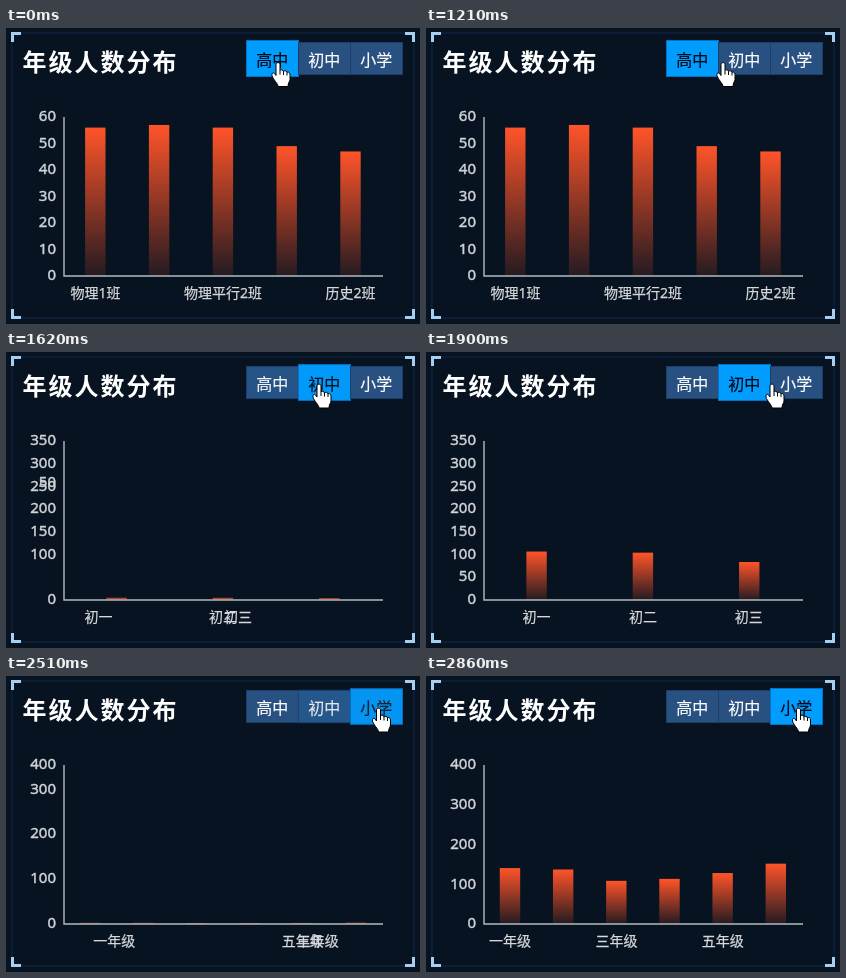
Animation of 414x296 px, one loop 2.92 s. Source, as an HTML page:

```html
<!DOCTYPE html>
<html lang="zh-CN">
<head>
<meta charset="utf-8">
<title>年级人数分布</title>
<style>
  html, body { margin: 0; width: 100%; height: 100%; overflow: hidden; background: #071320; }
  svg { display: block; width: 414px; height: 296px; font-family: "Noto Sans", "Noto Sans CJK SC", "Noto Sans CJK", sans-serif; }
  .title { font: bold 24px "Noto Sans CJK SC", "Noto Sans CJK", sans-serif; letter-spacing: 2px; fill: #fff; }
  .tab { font-size: 16px; text-anchor: middle; }
  .y { font-size: 15px; text-anchor: end; fill: #d0d3d7; stroke: #d0d3d7; stroke-width: .45px; }
  .x { font-size: 14px; text-anchor: middle; fill: #d6d8db; stroke: #d6d8db; stroke-width: .25px; }
</style>
</head>
<body>
<svg viewBox="0 0 414 296">
  <defs>
    <linearGradient id="bar" x1="0" y1="0" x2="0" y2="1">
      <stop offset="0" stop-color="#ff5429"/>
      <stop offset="1" stop-color="#ff5429" stop-opacity=".12"/>
    </linearGradient>
  </defs>
  <rect width="414" height="296" fill="#071320"/>
  <rect x="6" y="5" width="402" height="285" fill="none" stroke="#132a4c"/>
  <path d="M6.5 14V5.5H15M399 5.5H407.5V14M407.5 281V289.5H399M15 289.5H6.5V281" fill="none" stroke="#a6d0f2" stroke-width="3"/>
  <text class="title" x="16.5" y="42.5">年级人数分布</text>
  <g id="tabs"></g>
  <g id="chart"></g>
  <path d="M58 89V248H377" fill="none" stroke="#b4bac0" stroke-width="1.4"/>
  <g id="hand" stroke="#000" stroke-linejoin="round">
    <path fill="#fff" d="M-2 2C-2-.5 2-.5 2 2V8C2 7 5.5 7 5.5 9C6 8 9 8 9 10C9.5 9 12 9.5 12 12V17C12 19 10 20 10 24H0C0 21-5 17-6 13C-6.5 10-4 10-3.5 11L-2 13Z"/>
    <path fill="none" d="M2 8V12M5.5 9V12.5M9 10V13"/>
  </g>
</svg>
<script>
const LOOP = 2920, LEFT = 58, BASE = 248, WIDTH = 319, HEIGHT = 159;

// Each stage: click time, axis maximum and step, category names, label interval, bar values
const stages = [
  { start: -5000, max: 60, step: 10, every: 2, tab: '高中',
    names: ['物理1班', '物理2班', '物理平行2班', '历史1班', '历史2班'], values: [56, 57, 56, 49, 47] },
  { start: 1456, max: 350, step: 50, every: 1, tab: '初中',
    names: ['初一', '初二', '初三'], values: [324, 316.5, 254] },
  { start: 2370, max: 400, step: 100, every: 2, tab: '小学',
    names: ['一年级', '二年级', '三年级', '四年级', '五年级', '六年级'], values: [316, 308, 244, 255, 288, 341] }
];

// Screen refresh rhythm: [from, interval]
const rhythm = [[870, 68], [1480, 70], [2180, 66], [2510, 70]];

// Pointer tip: [time, x, y]
const route = [[870, 272, 34.5], [1040, 282, 30], [1210, 297, 34.5], [1350, 303, 33], [1415, 303, 33],
  [1620, 313, 32], [1760, 325, 32], [1900, 346, 32], [1970, 359, 32], [2180, 372.5, 31], [2510, 372.5, 32]];

const el = id => document.getElementById(id);
const clamp = p => Math.min(1, Math.max(0, p));
const mix = (a, b, p) => a + (b - a) * p;
const inOut = p => p < .5 ? 4 * p ** 3 : 1 - (2 - 2 * p) ** 3 / 2;
const blend = (a, b, p) => `rgb(${a.map((v, i) => Math.round(mix(v, b[i], p)))})`;

const xAt = (s, i) => LEFT + (i + .5) * WIDTH / s.names.length;
const yAt = (s, v) => BASE - v / s.max * HEIGHT;
const hasTick = (s, v) => v <= s.max && v % s.step === 0;
const hasName = (s, i) => i < s.names.length && i % s.every === 0;

function sample(t) {
  const r = rhythm.filter(([from]) => t >= from).pop();
  return r ? r[0] + Math.floor((t - r[0]) / r[1]) * r[1] : 0;
}

function drawTabs(t, n) {
  const p = 1 - (1 - clamp((t - stages[n].start) / 205)) ** 2;
  const tab = (s, i) => {
    const on = i === n ? p : i === n - 1 ? 1 - p : 0;
    const grow = 2 * on, x = 240.5 + 52 * i;
    const ink = blend([255, 255, 255], [0, 8, 20], on);
    return `<rect x="${x}" y="${14.5 - grow}" width="52" height="${32 + 2 * grow}"
        fill="${blend([40, 80, 128], [0, 157, 255], on)}" stroke="${blend([27, 62, 106], [6, 112, 196], on)}"/>
      <text class="tab" x="${x + 25.7}" y="37.5" fill="${ink}" stroke="${ink}" stroke-width=".2">${s.tab}</text>`;
  };
  el('tabs').innerHTML = stages.map(tab).join('');
}

function drawChart(t, n) {
  const s = stages[n], old = stages[n - 1] || s;
  const shift = inOut(clamp((t - s.start) / 500));
  const rise = inOut(clamp((t - s.start - 9) / 1000));
  let out = '';
  s.values.forEach((v, i) => {
    const h = v / s.max * HEIGHT * rise;
    out += `<rect x="${xAt(s, i) - 10.8}" y="${BASE - h}" width="20.4" height="${h}" fill="url(#bar)"/>`;
  });
  // Labels that existed before slide over; new ones appear in place
  for (let v = 0; v <= s.max; v += s.step) {
    const y = yAt(s, v);
    out += `<text class="y" x="50" y="${(hasTick(old, v) ? mix(yAt(old, v), y, shift) : y) + 4.3}">${v}</text>`;
  }
  s.names.forEach((name, i) => {
    if (!hasName(s, i)) return;
    const x = xAt(s, i);
    out += `<text class="x" x="${(hasName(old, i) ? mix(xAt(old, i), x, shift) : x) - .5}" y="269.5">${name}</text>`;
  });
  el('chart').innerHTML = out;
}

function drawHand(t) {
  const k = route.findIndex(r => r[0] > t);
  const b = route[k < 0 ? route.length - 1 : k];
  const a = k > 0 ? route[k - 1] : b;
  const p = a === b ? 0 : (t - a[0]) / (b[0] - a[0]);
  el('hand').setAttribute('transform', `translate(${mix(a[1], b[1], p)} ${mix(a[2], b[2], p)})`);
}

let last = -1;
function frame() {
  const t = sample(performance.now() % LOOP);
  if (t !== last) {
    const n = stages.filter(s => t >= s.start).length - 1;
    drawTabs(t, n);
    drawChart(t, n);
    drawHand(t);
    last = t;
  }
  requestAnimationFrame(frame);
}
frame();
</script>
</body>
</html>
```
